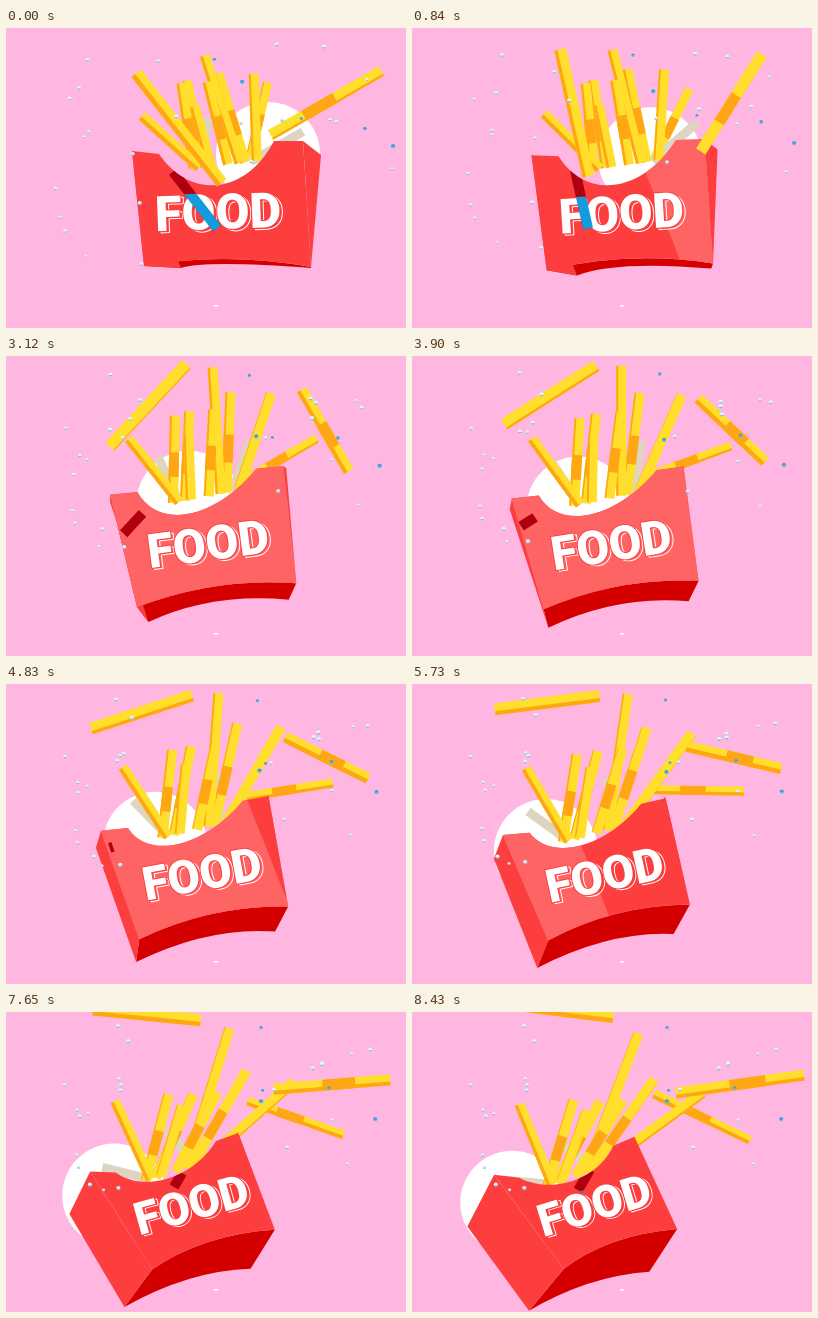
An HTML page with a canvas that plays this animation: 400x300 px, repeating every 8460 ms.

```html
<!DOCTYPE html>
<html lang="en">
<head>
<meta charset="utf-8">
<title>Floating fries</title>
<style>
html, body { margin: 0; width: 100%; height: 100%; overflow: hidden; background: #ffb6e1; }
canvas { display: block; width: 100vw; height: 100vh; }
</style>
</head>
<body>
<canvas id="stage" width="400" height="300"></canvas>
<script>
const ctx = document.getElementById('stage').getContext('2d');
const LOOP = 8460, STEP = 30;
const RED = '#fc3e3f', SHEEN = '#ff6464', DARK = '#d40000', SHADOW = '#b00010';
const YELLOW = '#ffdf2b', ORANGE = '#ffa614';

const mix = (a, b, u) => a + (b - a) * u;
const rad = deg => deg * Math.PI / 180;

// Parabola through a value at the start, the middle and the end of the loop.
const curve = (a, b, c, u) =>
  a * (1 - u) * (1 - 2 * u) + 4 * b * u * (1 - u) + c * u * (2 * u - 1);
const spot = ([a, b, c], u) => [curve(a[0], b[0], c[0], u), curve(a[1], b[1], c[1], u)];

// The carton turns: each corner follows one parabola.
const corners = {
  tl: [[126, 123], [98, 144], [82, 163]],
  notchL: [[153, 126], [125, 141], [107, 166]],
  dip: [[212, 157], [176, 159], [161, 169]],
  notchR: [[268, 113], [242, 115], [201, 134]],
  tr: [[297, 113], [268, 111], [222, 125]],
  right: [[315, 127], [268, 111], [222, 125]],
  br: [[305, 239], [285, 224], [265, 217]],
  mid: [[220, 231], [207, 230], [202, 230]],
  bl: [[138, 238], [132, 254], [152, 257]],
  left: [[126, 123], [95, 157], [55, 215]],
  foot: [[175, 240], [134, 274], [117, 299]],
  footMid: [[220, 236], [204, 250], [176, 272]],
  footR: [[305, 240], [274, 246], [237, 260]]
};
const backPath = [[262, 126], [160, 155], [100, 191]];
const wordPath = [[213, 184], [199, 189], [183, 193]];
const shadowPath = [[189, 172], [112, 165], [88, 150]];

// Fries in the carton: place along the rim, lengths and tilts from first to last.
const tucked = [
  { rim: .8, len: [60, 45], tilt: [60, -50], pale: true },
  { rim: .35, len: [50, 50], tilt: [10, -85], pale: true },
  { rim: .85, len: [87, 128], tilt: [-2, 54] },
  { rim: .75, len: [93, 113], tilt: [-17, 35], band: true },
  { rim: .7, len: [113, 150], tilt: [-18, 21] },
  { rim: .6, len: [85, 90], tilt: [-14, 32], band: true },
  { rim: .4, len: [88, 92], tilt: [-12, 28], band: true },
  { rim: .45, len: [62, 75], tilt: [-15, 20] },
  { rim: .3, len: [86, 90], tilt: [-8, 17], band: true },
  { rim: .35, len: [77, 87], tilt: [-48, -22] }
];

// Loose fries: centre, angle and length at the start, middle and end.
const side = { at: [[253, 92], [281, 105], [290, 105]], turn: [-77, -16, 26], len: [77, 85, 107], w: 9, band: true };
const high = { at: [[173, 100], [137, 35], [146, -2]], turn: [-128, -27, 7], len: [139, 108, 112], w: 12 };
const spin = { at: [[320, 75], [320, 74], [328, 72]], turn: [-30, -143, -188], len: [128, 92, 130], w: 11, band: true };

// Salt drifts quickly at first, then settles.
let seed = 11;
const random = () => (seed = seed * 16807 % 2147483647) / 2147483647;
const salt = Array.from({ length: 28 }, (_, i) => ({
  x: i % 2 ? mix(50, 128, random()) : mix(255, 375, random()),
  y: mix(12, 185, random()),
  dx: mix(-50, 50, random()),
  dy: mix(-40, 60, random()),
  r: mix(1.4, 2.2, random()),
  color: i % 6 ? '#e2f4ff' : '#36a5dc'
}));

function shape(color, build) {
  ctx.beginPath();
  build();
  ctx.closePath();
  ctx.fillStyle = color;
  ctx.fill();
}

function bar(x1, y1, x2, y2, w, color) {
  ctx.beginPath();
  ctx.moveTo(x1, y1);
  ctx.lineTo(x2, y2);
  ctx.lineWidth = w;
  ctx.strokeStyle = color;
  ctx.stroke();
}

const disc = (x, y, r, color) => shape(color, () => ctx.arc(x, y, r, 0, 7));
const move = p => ctx.moveTo(...p);
const line = p => ctx.lineTo(...p);

// Arc from a to b passing through m.
const arc = (a, m, b) =>
  ctx.quadraticCurveTo(2 * m[0] - (a[0] + b[0]) / 2, 2 * m[1] - (a[1] + b[1]) / 2, ...b);

// A fry from foot to tip, with its darker side facing down and left.
function drawFry(x1, y1, x2, y2, w, band) {
  const len = Math.hypot(x2 - x1, y2 - y1);
  const nx = (y1 - y2) / len, ny = (x2 - x1) / len;
  const lit = ny * .87 - nx * .5;
  const edge = w * .42 * Math.abs(lit), off = Math.sign(lit) * (w - edge) / 2;
  bar(x1, y1, x2, y2, w, YELLOW);
  if (band) bar(mix(x1, x2, .3), mix(y1, y2, .3), mix(x1, x2, .58), mix(y1, y2, .58), w, ORANGE);
  if (edge > .1) bar(x1 + nx * off, y1 + ny * off, x2 + nx * off, y2 + ny * off, edge, ORANGE);
}

function drawTucked({ rim, len, tilt, band, pale }, box, u) {
  const x = mix(box.notchL[0], box.notchR[0], rim);
  const y = mix(box.notchL[1], box.notchR[1], rim) + 18;
  const a = rad(mix(...tilt, u)), l = mix(...len, u);
  const tip = [x + Math.sin(a) * l, y - Math.cos(a) * l];
  if (pale) bar(x, y, ...tip, 9, '#ddd5c2');
  else drawFry(x, y, ...tip, 10, band);
}

function drawLoose(fry, u) {
  const [x, y] = spot(fry.at, u);
  const a = rad(curve(...fry.turn, u)), h = curve(...fry.len, u) / 2;
  const dx = Math.cos(a) * h, dy = Math.sin(a) * h;
  drawFry(x - dx, y - dy, x + dx, y + dy, fry.w, fry.band);
}

function traceFront(b) {
  const bend = k => (8 * b.dip[k] - b.notchL[k] - b.notchR[k]) / 6;
  const lean = k => (b.notchR[k] - b.notchL[k]) * .24;
  move(b.tl);
  line(b.notchL);
  ctx.bezierCurveTo(bend(0) - lean(0), bend(1) - lean(1), bend(0) + lean(0), bend(1) + lean(1), ...b.notchR);
  line(b.tr);
  line(b.br);
  arc(b.br, b.mid, b.bl);
}

function drawShadow(x, y, deg, len, color) {
  if (len <= 0) return;
  const dx = Math.cos(rad(deg)) * len / 2, dy = Math.sin(rad(deg)) * len / 2;
  bar(x - dx, y - dy, x + dx, y + dy, 10, color);
}

function drawShadows(u, color) {
  drawShadow(...spot(shadowPath, u), curve(...high.turn, u), 72 * (1 - u / .6), color);
  drawShadow(172, 168, -60, 80 * (u - .7), color);
}

function drawFront(b, u) {
  ctx.save();
  shape(RED, () => traceFront(b));
  ctx.clip();
  // A wide slanted sheen sweeps from right to left.
  const x = 300 - 846 * u;
  shape(SHEEN, () => {
    move([x, 100]); line([x + 418, 100]); line([x + 485, 270]); line([x + 67, 270]);
  });
  drawShadows(u, SHADOW);
  ctx.restore();
}

function drawWord(u) {
  ctx.save();
  ctx.translate(...spot(wordPath, u));
  ctx.rotate(rad(mix(-2, -17, u)));
  ctx.scale(mix(1, .92, u), mix(1, .92, u));
  ctx.font = '900 49px Roboto, "Open Sans", sans-serif';
  ctx.textAlign = 'center';
  ctx.lineJoin = 'round';
  ctx.strokeStyle = '#fff';
  ctx.lineWidth = 1;
  ctx.strokeText('FOOD', 2, 19);
  ctx.strokeStyle = RED;
  ctx.lineWidth = 2;
  ctx.strokeText('FOOD', -1, 17);
  ctx.fillStyle = '#fff';
  ctx.fillText('FOOD', -1, 17);
  ctx.beginPath();
  ctx.rect(-60, -19, 120, 38);
  ctx.restore();
}

// Shadows turn blue where they cross the word.
function drawCrossing(u) {
  ctx.save();
  ctx.clip();
  drawShadows(u, '#159bdc');
  ctx.restore();
}

function drawBox(b, u) {
  shape(DARK, () => {
    move(b.bl); arc(b.bl, b.mid, b.br);
    line(b.footR); arc(b.footR, b.footMid, b.foot);
  });
  shape(RED, () => { move(b.tl); line(b.left); line(b.foot); line(b.bl); });
  shape(RED, () => { move(b.tr); line(b.right); line(b.br); });
  drawFront(b, u);
  drawWord(u);
  drawCrossing(u);
}

function drawSalt(u) {
  const away = (1 - u) ** 3;
  for (const { x, y, dx, dy, r, color } of salt) {
    const gx = x + dx * away, gy = y + dy * away;
    disc(gx, gy, r, color);
    shape('#83b8df', () => ctx.arc(gx, gy, r, .3, 2.8));
  }
}

function draw(u) {
  ctx.fillStyle = '#ffb6e1';
  ctx.fillRect(0, 0, 400, 300);
  const box = {};
  for (const k in corners) box[k] = spot(corners[k], u);

  disc(...spot(backPath, u), 52, '#fff');
  drawLoose(side, u);
  tucked.forEach(f => drawTucked(f, box, u));
  drawBox(box, u);
  drawLoose(high, u);
  drawLoose(spin, u);
  drawSalt(u);
  ctx.fillStyle = '#fff';
  ctx.fillRect(208, 277, 4, 1.5);
}

const start = performance.now();
function tick() {
  const t = (performance.now() - start) % LOOP;
  draw(Math.floor(t / STEP) * STEP / LOOP);
  requestAnimationFrame(tick);
}
tick();
</script>
</body>
</html>
```
